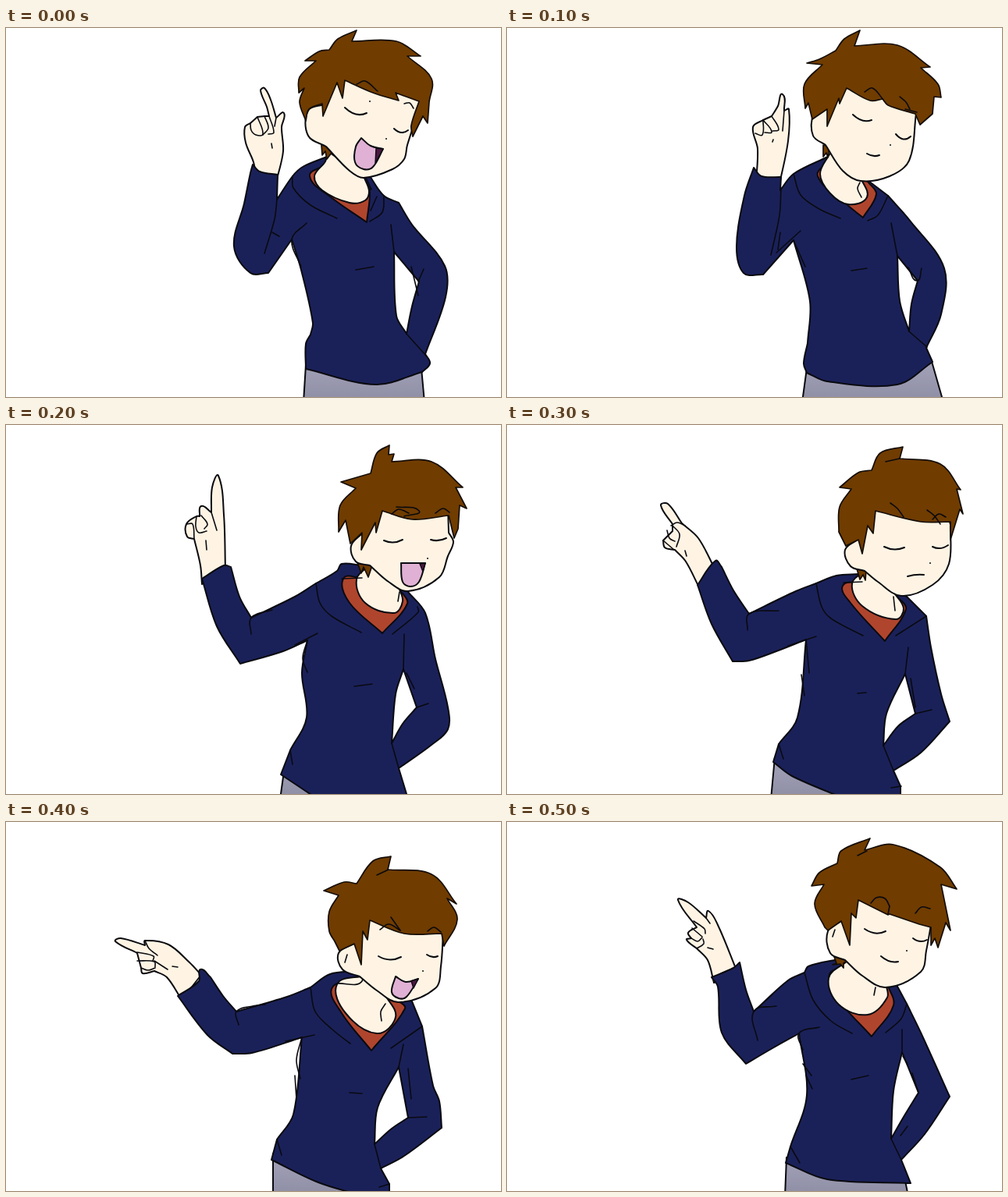
Animation, 634 px wide and 473 px high, one loop 600 ms. Source, as an HTML page:

```html
<!DOCTYPE html>
<html lang="en">
<head>
<meta charset="utf-8">
<title>Pointing</title>
<style>
html, body { margin: 0; width: 100%; height: 100%; overflow: hidden; background: #fff; }
svg { display: block; width: 100vw; height: 100vh; }
path { stroke: #0a0a10; stroke-width: 2; stroke-linecap: round; stroke-linejoin: round; fill: none; }
.pants { fill: url(#cloth); }
.hand, .neck, .face { fill: #fff4e4; }
.body { fill: #1a2159; }
.gap { fill: #fff; }
.shirt { fill: #b0452d; }
.tuft, .hair { fill: #703c00; stroke: #140d05; stroke-width: 1.7; }
.mouth { fill: #e0b1d4; }
.dark { fill: #4a1740; stroke-width: 1.4; }
.line { stroke-width: 1.6; }
</style>
</head>
<body>
<svg id="stage" viewBox="0 0 634 473">
<defs>
<linearGradient id="cloth" gradientUnits="userSpaceOnUse" x1="0" y1="435" x2="0" y2="473">
<stop offset="0" stop-color="#a09fb5"/><stop offset="1" stop-color="#9090a7"/>
</linearGradient>
</defs>
</svg>
<script>
const stage = document.getElementById("stage");
let group;

function make(tag, attrs, parent) {
  const el = document.createElementNS("http://www.w3.org/2000/svg", tag);
  for (const key in attrs) el.setAttribute(key, attrs[key]);
  return parent.appendChild(el);
}

// Joins points with a smooth curve; "!" marks a corner.
function curve(text, closed) {
  const pts = text.split(" ").map(word => {
    const [x, y] = word.split(",").map(parseFloat);
    return { x, y, sharp: word.endsWith("!") };
  });
  const n = pts.length;
  const at = i => closed ? pts[(i + n) % n] : pts[Math.max(0, Math.min(n - 1, i))];

  // Control point beside point i, towards its neighbour at i + step.
  const handle = (i, step) => {
    const p = at(i), next = at(i + step), prev = p.sharp ? p : at(i - step);
    const dx = next.x - prev.x, dy = next.y - prev.y;
    const reach = Math.hypot(next.x - p.x, next.y - p.y) / 3 / (Math.hypot(dx, dy) || 1);
    return `${(p.x + dx * reach).toFixed(1)} ${(p.y + dy * reach).toFixed(1)}`;
  };

  let d = `M${pts[0].x} ${pts[0].y}`;
  for (let i = 0; i < (closed ? n : n - 1); i++) {
    const end = at(i + 1);
    d += `C${handle(i, 1)} ${handle(i + 1, -1)} ${end.x} ${end.y}`;
  }
  return closed ? d + "Z" : d;
}

const shape = (name, pts) => make("path", { class: name, d: curve(pts, true) }, group);
const line = pts => make("path", { class: "line", d: curve(pts) }, group);
const lines = (...all) => all.forEach(line);

function arc(x1, y1, x2, y2, dip) {
  const d = `M${x1} ${y1}Q${(x1 + x2) / 2} ${(y1 + y2) / 2 + dip * 2} ${x2} ${y2}`;
  make("path", { d }, group);
}
const dot = (x, y) => arc(x, y, x, y, 0);

function lecture() {
  shape("pants", "384,432! 381,480! 536,480! 532,436!");
  shape("hand", "320,190! 317,172 307,147 306,127 313,122! 322,114! 331,113! 337,113! 334,101 326,80 331,77 339,92 346,115! 356,109 353,127 355,158 347,194!");
  lines("313,122 314,131 320,137 329,136 322,114", "331,113 336,128 329,137", "337,113 343,134 336,136", "346,115 344,126", "340,148 341,154");
  shape("body", "348,188! 347,220! 367,190 380,178 411,165! 466,190! 484,215 503,224! 520,252 562,305 563,345 537,418! 543,430 533,441! 474,457 384,437! 384,405 390,393! 393,378 378,310 366,271! 336,314! 313,314 292,280 305,225 313,186 316,175! 325,184");
  shape("gap", "497,287! 529,325! 520,357 513,392! 500,369");
  shape("shirt", "408,176! 389,190 415,216 462,249! 466,208 459,196!");
  shape("neck", "412,158! 409,171 395,190 405,208 440,224 460,221 465,209 458,190!");
  lines("367,190 368,205 390,227 424,244", "484,215 482,236 466,248", "475,216 467,234", "460,190 468,207", "347,220 344,245 331,289", "341,262 350,267", "385,250 366,271 378,306", "493,252 497,287", "513,392 538,420", "519,306 528,343", "535,309 528,325", "448,310 471,306");
  shape("tuft", "404,150! 405,163! 409,158! 411,168! 417,160! 414,150!");
  shape("face", "407,98! 387,106 387,138 410,152! 440,183 458,192 495,181 510,168 514,150 532,95! 510,65! 435,50!");
  shape("mouth", "455,141! 467,151 483,155! 470,178 458,181 447,172 448,152");
  shape("dark", "474,154! 483,155! 473,173!");
  arc(434, 102, 462, 109, 5);
  arc(497, 129, 515, 131, 4);
  dot(466, 94);
  dot(487, 142);
  shape("hair", "384,119! 376,95 382,77! 375,83! 376,63 397,42! 383,42! 401,30 414,28! 425,14 449,3! 443,17! 500,17 531,36! 514,36! 545,65 542,95! 540,122! 534,113! 521,139! 519,125 529,94! 499,83! 503,93! 470,83 434,67! 431,90! 424,70! 406,113! 405,97! 388,104");
  lines("449,72 460,68 476,81", "510,97 517,96 522,103");
}

function pause() {
  shape("pants", "384,436! 378,480! 559,480! 543,424!");
  shape("hand", "319,198! 321,155 315,127 328,118! 339,113! 347,100 353,85 355,106! 361,104 360,145 349,200!");
  lines("328,118 327,137 318,135", "328,118 339,133 330,134", "339,113 348,130 340,132", "355,106 353,132", "341,143 340,146");
  shape("body", "351,191! 350,208! 367,187 411,165! 463,196! 488,215! 517,248 560,308 556,367 537,410! 545,428! 500,457 410,453 384,442! 380,430 385,404! 388,350 367,272! 328,316! 303,314 294,280 304,215 316,179! 326,190");
  shape("gap", "500,292! 526,324! 518,354 515,389! 503,350");
  shape("shirt", "412,170! 398,190 435,226 456,243! 473,213 462,197!");
  shape("neck", "414,160! 401,187 414,212 437,226 461,217 453,192!");
  lines("367,187 376,214 400,232 427,244", "488,215 475,240 462,247", "452,198 449,206 454,217", "351,205 349,240 338,291", "376,260 345,288", "350,262 347,284", "367,272 382,306", "492,250 500,292", "515,389 538,409", "514,307 525,324 531,308", "441,311 461,308");
  shape("tuft", "405,150! 405,165! 409,160! 411,166! 413,152!");
  shape("face", "409,103! 393,110 392,138 408,150! 430,183 453,196 490,190 515,170 524,110! 510,80! 435,65!");
  arc(461, 161, 477, 163, 2);
  arc(443, 111, 467, 118, 4);
  arc(498, 136, 517, 139, 5);
  dot(491, 150);
  shape("hair", "410,126! 410,104! 391,117! 386,96! 382,103! 381,72 404,47! 384,45! 400,40 421,29! 432,14 452,3! 445,23! 500,22 542,50! 530,51! 552,72 556,89! 547,88! 545,110! 529,124! 523,110! 488,99 481,91! 465,93 435,77! 426,97! 425,90!");
  lines("458,82 468,77 482,92", "503,88 511,95 516,104", "510,104 525,108");
}

function exclaim() {
  shape("pants", "356,444! 351,480! 400,480!");
  shape("hand", "251,204! 249,180 241,146! 232,143 231,127 244,117 248,117! 250,104 263,112! 264,80 272,65 279,115 281,186!");
  lines("232,127 239,127 241,145", "244,117 243,130 247,138 257,136", "250,116 258,127 254,133", "263,112 270,135", "256,148 257,160");
  shape("body", "288,182! 299,220 314,247! 370,220 397,203! 424,187 430,178 455,180! 515,214! 537,241 550,300 566,362 566,390 545,410 503,440! 513,473! 513,480! 400,480! 352,448! 364,417! 385,375 379,318 386,276! 355,290 300,306! 270,258 251,197! 279,180");
  shape("gap", "509,313! 526,362! 508,383 494,408! 499,345");
  shape("shirt", "456,196! 432,197 440,228 482,267! 514,229 505,212!");
  shape("neck", "468,178! 449,198 460,228 497,241 508,226 503,208!");
  lines("397,203 402,228 417,245 455,266", "527,233 528,240 495,268", "430,197 456,196", "504,214 502,226", "314,268 314,247 341,237", "399,267 370,282", "386,276 380,299 386,317", "510,268 509,313", "526,362 541,357", "513,318 523,338", "494,408 503,440", "446,335 469,332", "364,417 367,435");
  shape("tuft", "450,176! 455,190! 458,182! 464,195! 469,180!");
  shape("face", "456,139! 442,155 448,175 466,180! 490,201 515,213 555,195 566,168! 573,150 567,138! 566,105! 480,90!");
  shape("mouth", "506,177! 537,177! 529,201 518,207 508,201");
  shape("dark", "530,178! 537,177! 534,188!");
  arc(484, 148, 508, 147, 3);
  arc(544, 147, 564, 145, 2);
  dot(540, 171);
  shape("hair", "426,137! 428,103 448,81! 429,73! 467,62! 475,36 491,26! 490,38! 497,37! 494,47! 545,47 585,80! 576,80! 590,107! 581,103! 579,133! 574,145! 567,116! 520,121 482,110! 474,138! 473,125! 455,160! 456,138! 441,152! 435,122!");
  lines("494,114 503,108 516,113", "500,105 529,110 510,117", "550,113 560,107 568,112");
}

function wave() {
  shape("pants", "343,426! 338,480! 432,480!");
  shape("hand", "246,208! 229,175 215,160! 202,157 200,148! 212,136! 212,127! 197,103 206,101 224,126! 245,145 266,184!");
  lines("210,129 218,125 228,129", "212,129 221,140 217,156", "205,135 208,145 215,149", "200,148 214,160", "228,161 230,168");
  shape("body", "275,182! 290,212 310,242! 370,213 396,203! 422,193 450,191! 512,220! 537,245! 543,285 556,345 567,380! 530,420 495,443! 504,463! 504,480! 435,480! 365,450 341,432! 348,409! 372,375 383,275! 345,290 310,302 289,303! 262,255 244,205! 267,174");
  shape("gap", "510,319! 523,370! 501,386 482,411! 486,370");
  shape("shirt", "455,201! 430,206 440,228 484,277! 511,236 500,220!");
  shape("neck", "461,186! 442,203 455,232 498,249 508,235 495,214!");
  lines("396,203 403,233 415,248 456,270", "537,245 498,270", "431,202 455,201", "495,220 497,238", "308,263 310,242 348,238", "396,271 360,283", "383,275 387,318", "377,320 381,347", "514,285 510,319", "523,370 544,365", "517,325 523,362", "482,411 495,443", "449,344 460,343", "348,409 354,428", "492,465 505,463");
  shape("tuft", "448,184! 452,198! 456,192! 459,199! 460,186!");
  shape("face", "449,147! 433,160 440,181 458,187! 475,201 505,219 545,205 566,178 568,128! 560,95! 470,90!");
  arc(513, 194, 534, 192, -1);
  arc(483, 156, 509, 157, 3);
  arc(545, 156, 565, 154, 3);
  dot(542, 177);
  shape("hair", "425,137! 426,105 441,82! 426,80! 450,61 467,58! 478,36 507,28! 503,43! 555,50 581,83! 576,82! 584,114! 580,108! 568,147! 568,124! 530,124 472,110! 469,139! 462,129! 455,165! 450,147! 434,155!");
  lines("491,100 500,107 508,118", "485,47 503,43", "538,109 547,116 555,127", "545,121 553,114 562,118");
}

function point() {
  shape("pants", "342,425! 342,480! 470,480!");
  shape("hand", "225,228! 206,199 190,191! 175,194 173,187! 168,168! 140,153 147,149 178,158! 178,152 208,157 235,180 250,196!");
  lines("178,152 183,162 194,171", "168,167 189,172 188,178", "168,178 190,179 191,186", "173,187 182,190 191,187", "190,178 207,189", "213,185 220,186");
  shape("body", "262,199! 278,223 295,243! 360,224 390,212! 415,195 448,191! 520,230! 533,262! 547,338 555,358 558,392! 510,428 480,444! 491,464! 491,480! 460,480! 400,462 340,433! 347,407! 368,375 379,276! 315,296 290,297! 258,273 220,223! 247,204 249,189");
  shape("gap", "503,314! 515,379! 494,393 472,413! 476,366");
  shape("shirt", "455,205! 418,212 430,245 468,293! 511,239 500,228!");
  shape("neck", "459,197! 424,208 435,245 475,271 499,250 486,222!");
  lines("390,212 396,243 418,266 441,284", "533,262 493,290", "437,189 456,204 425,207", "486,233 480,243 481,255", "298,260 295,243 316,236 332,234", "395,273 358,281", "379,276 372,305 377,329", "370,325 372,355", "509,285 503,314", "515,379 539,378", "515,316 519,355", "472,413 480,444", "440,347 456,348", "347,407 353,427", "478,468 491,464");
  shape("face", "446,156! 426,168 431,189 453,198! 475,216 503,231 550,213 557,185 560,142! 550,110! 468,105!");
  line("437,170 434,180");
  shape("mouth", "499,198! 512,205 528,201! 513,224 503,226 494,218");
  shape("dark", "519,204! 528,201! 522,213!");
  arc(477, 172, 506, 173, 4);
  arc(539, 170, 553, 172, 2);
  dot(534, 191);
  shape("hair", "421,153! 414,140 414,115 426,94! 407,88! 433,77 449,79! 470,50 493,44! 489,61! 545,67 577,105! 565,98! 578,125 561,159! 558,143! 510,143 466,126! 463,151! 457,140! 455,183! 446,156! 427,165!");
  lines("479,138 490,131 505,139", "493,122 505,139", "475,68 490,61", "540,140 548,135 557,141");
}

function retract() {
  shape("pants", "358,430! 356,480! 514,480! 509,455!");
  shape("hand", "265,206! 257,177 243,162! 230,151 236,149! 232,142 243,135! 219,100 232,103 255,123! 258,114 270,132 294,190!");
  lines("239,127 253,137 254,143", "236,149 244,153 250,148", "237,136 250,147", "243,162 252,156 251,150", "255,123 260,130", "257,161 264,163");
  shape("body", "298,180! 306,215 316,243! 360,203 381,193! 386,185 424,176! 498,207! 512,233! 530,270 567,352! 535,400 505,433! 517,463! 410,458 357,437! 363,416! 384,350 374,271! 340,290 306,310! 275,270 270,211 262,199! 290,187");
  shape("gap", "506,295! 527,347! 508,378 492,406! 495,345");
  shape("shirt", "430,186! 413,195 420,222 467,275! 495,235 487,208!");
  shape("neck", "436,178! 412,200 425,234 462,247 487,225 485,207!");
  lines("381,193 392,228 415,255 442,271", "512,233 505,252 485,270", "472,212 470,222", "321,280 316,243 345,236", "323,237 340,221", "400,263 374,271 379,292", "379,310 390,325", "383,325 391,342", "506,266 506,295", "527,347 519,322", "507,300 513,311", "492,406 505,433", "441,330 463,325", "363,416 375,437", "513,390 504,402");
  shape("tuft", "418,170! 422,181! 417,183! 427,182! 431,187! 431,181! 436,178!");
  shape("face", "428,127! 411,140 414,168 433,177! 455,197 485,212 530,192 537,165 545,120! 530,90! 450,80!");
  line("420,138 417,147");
  arc(479, 172, 501, 179, 3);
  arc(458, 137, 485, 140, 4);
  arc(520, 149, 538, 151, 3);
  dot(512, 165);
  shape("hair", "407,135! 394,105 406,80! 390,82! 400,65 423,53! 428,37 465,21! 458,36! 495,29 555,58 576,86! 556,80! 568,139! 562,129! 552,161! 548,149! 543,158! 543,135! 528,131! 490,118! 488,119! 450,100! 447,123! 441,117! 439,158! 428,127! 411,139!");
  lines("466,104 473,97 484,98 490,108", "490,108 488,118", "523,117 531,109 542,111", "449,43 461,37");
}

const poses = [lecture, pause, exclaim, wave, point, retract].map(paint => {
  group = make("g", { display: "none" }, stage);
  paint();
  return group;
});

const hold = 100;
function show(time) {
  const current = Math.floor(time / hold) % poses.length;
  poses.forEach((pose, i) => pose.setAttribute("display", i === current ? "inline" : "none"));
}

const start = performance.now();
function tick() {
  show(performance.now() - start);
  requestAnimationFrame(tick);
}
tick();
</script>
</body>
</html>
```
